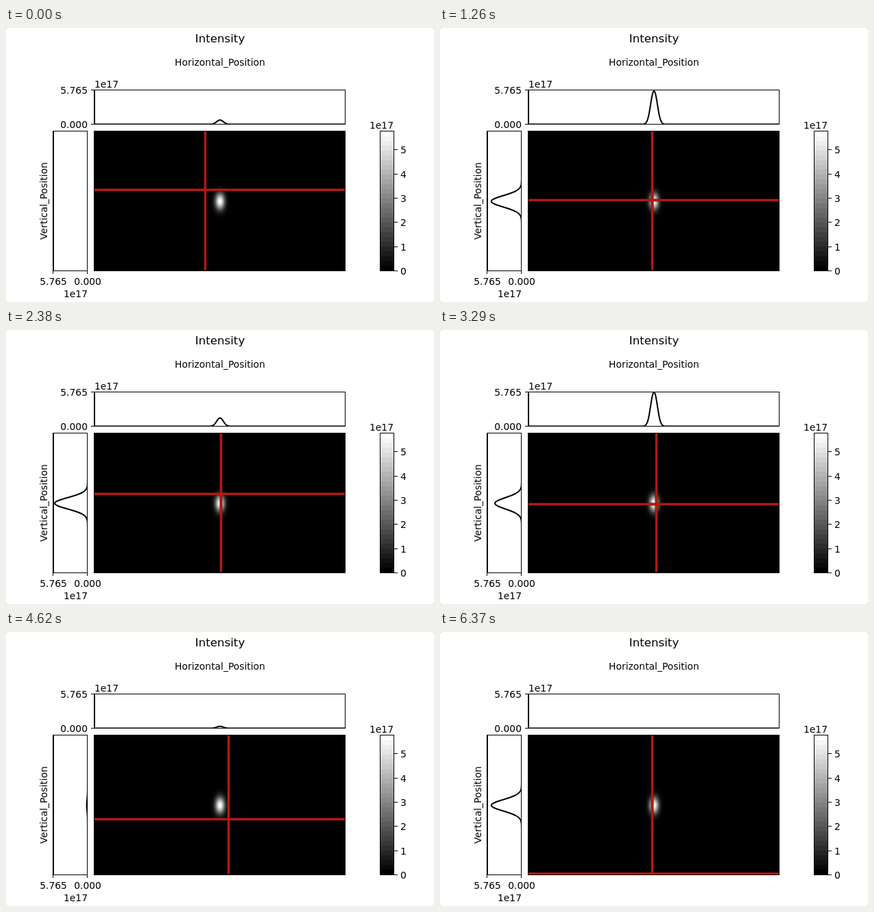
Animation of 624x400 px, one loop 6.44 s. Source, as an HTML page with a canvas:

```html
<!DOCTYPE html>
<html lang="en">
<head>
<meta charset="utf-8">
<title>Intensity</title>
<style>
html, body { margin: 0; width: 100%; height: 100%; overflow: hidden; background: #fff; }
canvas { display: block; }
</style>
</head>
<body>
<canvas id="stage" width="624" height="400"></canvas>
<script>
const ctx = document.getElementById('stage').getContext('2d');
const STEP = 70, COUNT = 92;
const IMG = { x: 128, y: 150, w: 367, h: 205 };
const SPOT = { x: 312, y: 253 };

// Pointer stops: step, x, y
const stops = [
  [0, 290.5, 236], [8, 300, 243], [18, 309.5, 251], [34, 313.5, 239],
  [47, 315.5, 254], [50, 311, 254], [66, 324.5, 273], [78, 303.5, 235],
  [88, 312.5, 241], [91, 309.5, 352.5]
];

const acrossX = x => Math.exp(-0.018 * Math.pow(Math.abs(x - SPOT.x), 2.1));
const acrossY = y => Math.exp(-Math.pow((y - SPOT.y) / 8.3, 2) / 2);

function pointerAt(n) {
  const i = Math.max(1, stops.findIndex(s => s[0] >= n));
  const [n0, x0, y0] = stops[i - 1], [n1, x1, y1] = stops[i];
  const u = (n - n0) / (n1 - n0), k = u * u * (3 - 2 * u);
  const mix = (a, b) => Math.round((a + (b - a) * k) * 2) / 2;
  return { x: mix(x0, x1), y: mix(y0, y1) };
}

function layer(draw) {
  const c = document.createElement('canvas');
  c.width = 624;
  c.height = 400;
  draw(c.getContext('2d'));
  return c;
}

function drawSpot(g) {
  const { data, ...size } = IMG;
  const image = g.createImageData(size.w, size.h);
  for (let p = 0; p < size.w * size.h; p++) {
    const x = IMG.x + p % size.w + 0.5;
    const y = IMG.y + Math.floor(p / size.w) + 0.5;
    image.data.fill(255 * acrossX(x) * acrossY(y), p * 4, p * 4 + 3);
    image.data[p * 4 + 3] = 255;
  }
  g.putImageData(image, IMG.x, IMG.y);
}

function drawAxes(g) {
  const text = (s, x, y, align = 'center', size = 13.89) => {
    g.font = size + 'px "DejaVu Sans", sans-serif';
    g.textAlign = align;
    g.fillText(s, x, y);
  };
  const box = (x, y, w, h) => g.strokeRect(x + 0.5, y + 0.5, w, h);
  g.fillStyle = g.strokeStyle = '#000';

  text('Intensity', 312, 21, 'center', 16.67);
  text('Horizontal_Position', 312, 55);
  text('1e17', 129, 87, 'left');
  text('5.765', 119, 96, 'right');
  text('0.000', 119, 146, 'right');
  text('5.765', 69, 375);
  text('0.000', 119, 375);
  text('1e17', 119, 393, 'right');
  text('1e17', 530, 147, 'left');
  g.save();
  g.translate(59.5, 252.5);
  g.rotate(-Math.PI / 2);
  text('Vertical_Position', 0, 0);
  g.restore();

  box(128, 90, 366, 50);
  box(68, 150, 50, 204);
  g.fillRect(128, 90, 2, 51);
  g.fillRect(68, 150, 2, 205);
  for (const y of [90, 140]) g.fillRect(124, y, 5, 1);
  for (const x of [68, 118]) g.fillRect(x, 354, 1, 5);

  const bands = 29;
  for (let i = 0; i < bands; i++) {
    const v = Math.round(255 * (1 - i / (bands - 1)));
    g.fillStyle = `rgb(${v},${v},${v})`;
    g.fillRect(545, 151 + i * 7, 20, 7);
  }
  g.fillStyle = '#000';
  box(545, 150, 20, 204);
  for (let i = 0; i <= 5; i++) {
    const y = Math.round(354 - i * 35.35);
    g.fillRect(566, y, 5, 1);
    text(String(i), 575, y + 6, 'left');
  }
  g.fillStyle = '#aaa';
  for (const x of [0, 623]) for (const y of [0, 399]) g.fillRect(x, y, 1, 1);
}

const spot = layer(drawSpot);
const axes = layer(drawAxes);

function curve(from, to, point, clip) {
  ctx.save();
  ctx.beginPath();
  ctx.rect(...clip);
  ctx.clip();
  ctx.beginPath();
  for (let v = from; v <= to; v++) ctx.lineTo(...point(v));
  ctx.strokeStyle = '#000';
  ctx.lineWidth = 2;
  ctx.lineJoin = 'round';
  ctx.stroke();
  ctx.restore();
}

function crosshair(p) {
  const bars = (half, color) => {
    ctx.fillStyle = color;
    ctx.fillRect(129, p.y + 0.3 - half, 365, half * 2);
    ctx.fillRect(p.x - half, 151, half * 2, 202);
  };
  ctx.save();
  ctx.beginPath();
  ctx.rect(129, 151, 365, 203);
  ctx.clip();
  bars(2, 'rgb(112,15,9)');
  bars(1.25, 'rgb(188,27,17)');
  ctx.restore();
}

function draw(now) {
  const p = pointerAt(Math.floor(now / STEP) % COUNT);
  const gx = acrossX(p.x), gy = acrossY(p.y);
  ctx.fillStyle = '#fff';
  ctx.fillRect(0, 0, 624, 400);
  ctx.drawImage(spot, 0, 0);
  crosshair(p);
  curve(128, 495, x => [x, 140.5 - 50 * gy * acrossX(x)], [128, 90, 367, 51]);
  curve(150, 355, y => [119 - 50 * gx * acrossY(y), y], [68, 150, 51, 205]);
  ctx.drawImage(axes, 0, 0);
}

let start = null;
function tick(now) {
  if (start === null) start = now;
  draw(now - start);
  requestAnimationFrame(tick);
}
draw(0);
requestAnimationFrame(tick);
</script>
</body>
</html>
```
